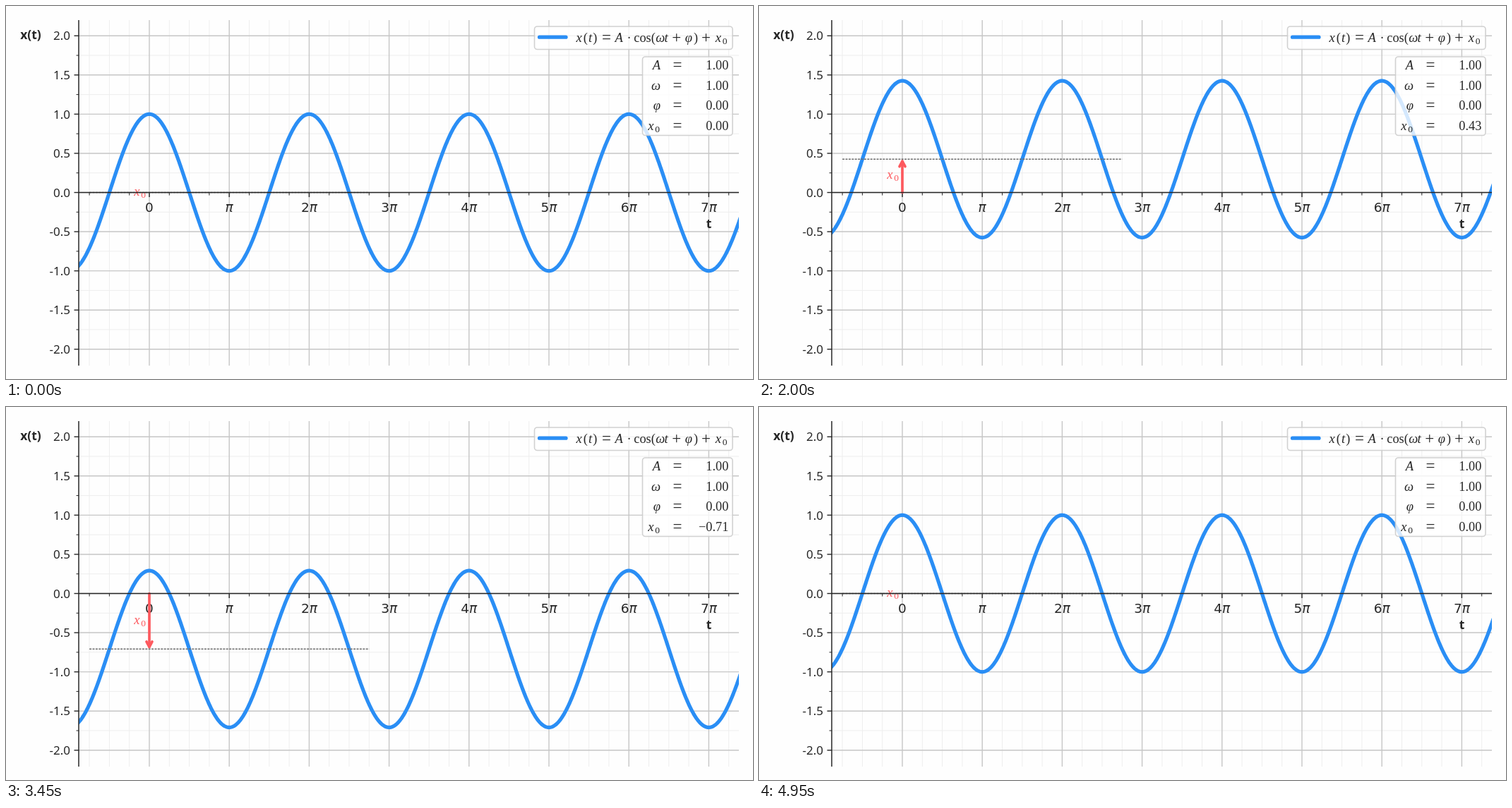
An HTML page with a canvas for the animation above (5 s loop, 1058x529 px).

```html
<!DOCTYPE html>
<html lang="en">
<head>
<meta charset="utf-8">
<title>Vertical shift of a cosine</title>
<style>
html, body { margin: 0; width: 100%; height: 100%; overflow: hidden; background: #fefefe; }
canvas { display: block; }
</style>
</head>
<body>
<canvas id="stage" width="1058" height="529"></canvas>
<script>
const ctx = document.getElementById('stage').getContext('2d');
const LEFT = 103, RIGHT = 1038, TOP = 20, BOTTOM = 510;
const BLUE = '#2a8ef5', RED = '#fd595e', INK = '#262626';
const SANS = '"Noto Sans", sans-serif';
const MATH = '"DejaVu Sans", sans-serif';
const SERIF = '"Liberation Serif", serif';
const STEP = 50, STEPS = 100;

const px = u => 203 + u * 113.2;      // u in units of pi
const py = v => 264.5 - v * 111.13;

function line(points, color, width) {
  ctx.beginPath();
  points.forEach(([x, y]) => ctx.lineTo(x, y));
  ctx.strokeStyle = color;
  ctx.lineWidth = width;
  ctx.stroke();
}

function text(s, x, y, font, align = 'left', color = INK) {
  ctx.font = font;
  ctx.textAlign = align;
  ctx.fillStyle = color;
  ctx.fillText(s, x, y);
}

const italic = (s, x, y, align, color) => text(s, x, y, `italic 18.5px ${SERIF}`, align, color);
const roman = (s, x, y, align) => text(s, x, y, `18.3px ${SERIF}`, align);
const operator = (s, x, y) => text(s, x, y + 1, `23px ${SERIF}`, 'center');

function xZero(right, y, color) {
  italic('x', right - 8.5, y, 'right', color);
  text('0', right, y + 3, `13.5px ${SERIF}`, 'right', color);
}

function panel(x, y, w, h) {
  ctx.beginPath();
  ctx.roundRect(x, y, w, h, 4);
  ctx.fillStyle = 'rgba(255,255,255,.8)';
  ctx.fill();
  ctx.strokeStyle = 'rgba(204,204,204,.9)';
  ctx.lineWidth = 1.6;
  ctx.stroke();
}

function grid() {
  for (const major of [false, true]) {
    const color = major ? '#c6c6c6' : '#eeeeee', width = major ? 1.4 : 1;
    for (let k = -3; k < 30; k++)
      if ((k % 4 === 0) === major) line([[px(k / 4), TOP], [px(k / 4), BOTTOM]], color, width);
    for (let k = -8; k <= 8; k++)
      if ((k % 2 === 0) === major) line([[LEFT, py(k / 4)], [RIGHT, py(k / 4)]], color, width);
  }
}

function ticks() {
  for (let k = -3; k < 30; k++) {
    const major = k % 4 === 0, x = px(k / 4);
    line([[x, py(0)], [x, py(0) + (major ? 6.5 : 4)]], INK, major ? 1.4 : 1);
    if (!major) continue;
    const n = k / 4;
    if (n === 0) {
      text('0', x, 291.5, `18.5px ${MATH}`, 'center');
    } else {
      const pi = `italic 18.5px ${MATH}`;
      text('π', n === 1 ? x - 5.6 : x + 0.3, 291.5, pi);
      if (n > 1) text(n, x + 0.3, 291.5, `18.5px ${MATH}`, 'right');
    }
  }
  for (let k = -8; k <= 8; k++) {
    const major = k % 2 === 0, y = py(k / 4);
    line([[LEFT - (major ? 6.5 : 3.5), y], [LEFT, y]], INK, major ? 1.4 : 1);
    if (major) text((k / 4).toFixed(1), 91, y + 6.2, `17px ${SANS}`, 'right');
  }
  text('x(t)', 35, 47, `bold 17.5px ${SANS}`, 'center');
  text('t', 995.5, 315, `bold 17.5px ${SANS}`, 'center');
}

function curve(shift) {
  const points = [];
  for (let x = LEFT - 4; x <= RIGHT + 4; x++)
    points.push([x, py(Math.cos((x - px(0)) / 113.2 * Math.PI) + shift)]);
  ctx.save();
  ctx.beginPath();
  ctx.rect(LEFT, TOP, RIGHT - LEFT, BOTTOM - TOP);
  ctx.clip();
  line(points, BLUE, 5.2);
  ctx.restore();
}

function shiftMark(shift) {
  const y = py(shift), x = px(0);
  ctx.setLineDash([3, 1.4]);
  line([[px(-0.75), y], [px(2.75), y]], '#6c6c6c', 1.4);
  ctx.setLineDash([]);
  xZero(198, py(shift / 2) + 4.5, RED);
  if (Math.abs(shift) < 1e-6) return;
  const back = Math.sign(shift), tip = y + 3 * back, barb = tip + 7.5 * back;
  ctx.save();
  ctx.lineCap = ctx.lineJoin = 'round';
  line([[x, py(0)], [x, tip]], RED, 3.7);
  line([[x - 4, barb], [x, tip], [x + 4, barb]], RED, 3.7);
  ctx.restore();
}

function legend() {
  panel(748.5, 29, 280.5, 32.5);
  ctx.lineCap = 'round';
  line([[755.5, 44.2], [793, 44.2]], BLUE, 5.2);
  ctx.lineCap = 'butt';
  const y = 51;
  [['x', 807.5], ['t', 825], ['A', 862.5], ['ω', 920.3], ['t', 932.5], ['φ', 961.8]]
    .forEach(([s, x]) => italic(s, x, y));
  [['(', 817.8], [')', 831.3], ['cos', 889.3], ['(', 913.8], [')', 974]]
    .forEach(([s, x]) => roman(s, x, y));
  [['=', 850.5], ['+', 949.8], ['+', 991.5]].forEach(([s, x]) => operator(s, x, y));
  roman('·', 882.5, y, 'center');
  xZero(1021.5, y);
}

function values(shift) {
  panel(901.5, 72, 127.5, 111.5);
  const rows = [['A', 1], ['ω', 1], ['φ', 0], ['x', shift]];
  rows.forEach(([name, value], i) => {
    const y = 90.3 + i * 28.5;
    if (name === 'x') xZero(926, y);
    else italic(name, 927, y, 'right');
    operator('=', 951, y);
    roman(value.toFixed(2).replace('-', '−'), 1023.3, y, 'right');
  });
}

function draw(now) {
  const step = Math.floor(now / STEP) % STEPS;
  const shift = 0.75 * Math.sin(2 * Math.PI * step / (STEPS - 1));
  ctx.fillStyle = '#fefefe';
  ctx.fillRect(0, 0, 1058, 529);
  grid();
  ticks();
  curve(shift);
  shiftMark(shift);
  line([[LEFT, TOP], [LEFT, BOTTOM]], INK, 1.5);
  line([[LEFT, py(0)], [RIGHT, py(0)]], INK, 1.5);
  legend();
  values(shift);
}

const start = performance.now();
function tick() {
  draw(performance.now() - start);
  requestAnimationFrame(tick);
}
tick();
</script>
</body>
</html>
```
